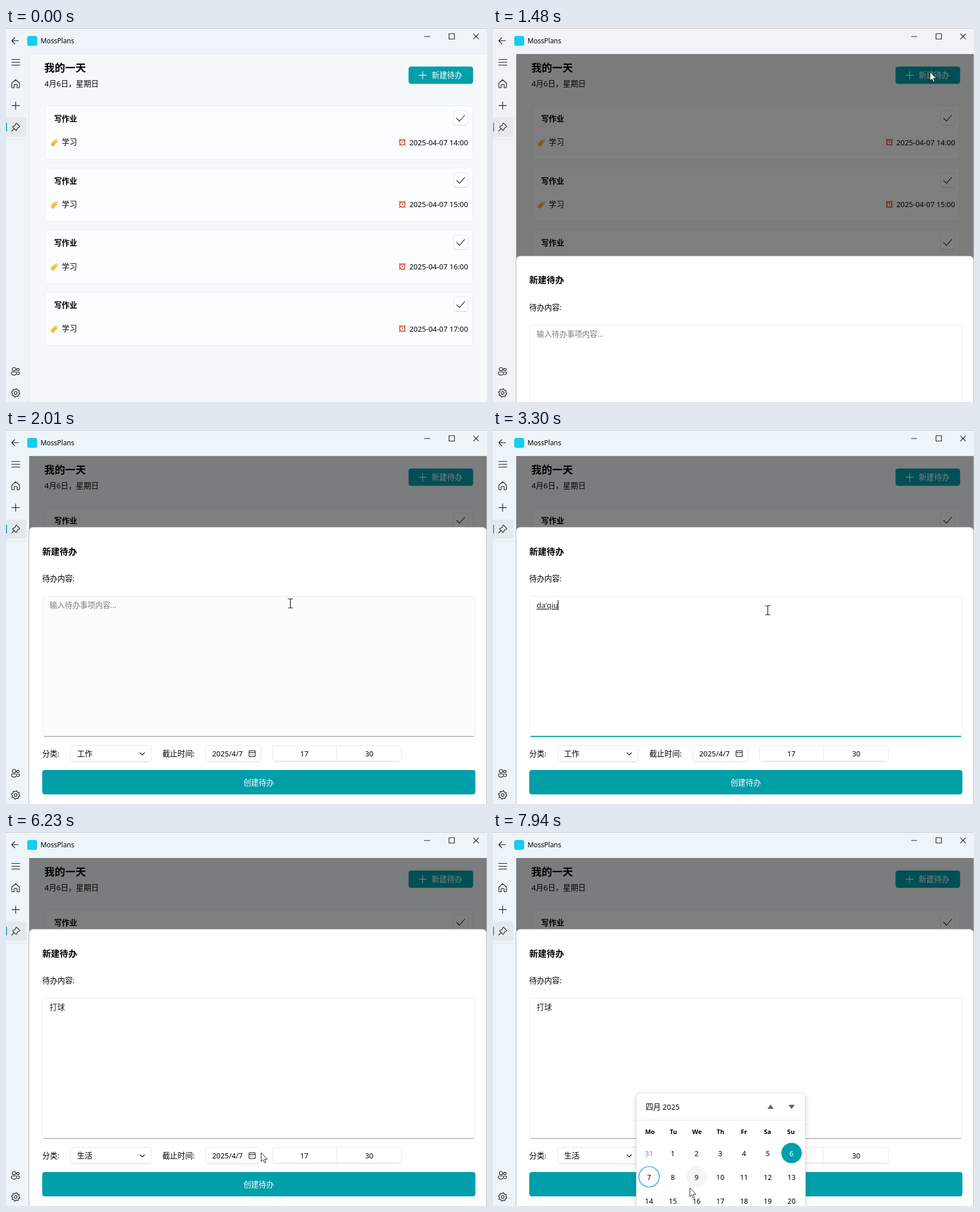
Animation of 849x660 px, one loop 8 s. Source, as an HTML page:

```html
<!DOCTYPE html>
<html lang="zh-CN">
<head>
<meta charset="utf-8">
<title>待办</title>
<style>
html, body { margin: 0; width: 100%; height: 100%; overflow: hidden; background: #f3f3f3; }
svg { display: block; width: 849px; height: 660px; }
text { font-family: "Noto Sans", "Open Sans", "Noto Sans CJK SC", "Noto Sans CJK JP", "Noto Sans CJK", sans-serif; white-space: pre; }
.line { fill: none; stroke: #1a1a1a; stroke-width: 1.15; stroke-linecap: round; stroke-linejoin: round; }
.pop { filter: drop-shadow(0 3px 5px rgba(0,0,0,.14)); }
</style>
</head>
<body>
<svg id="stage" viewBox="0 0 849 660" xmlns="http://www.w3.org/2000/svg"></svg>
<script>
const LOOP = 8000, TEAL = '#009faa', HOVER = '#00a7b3', PRESSED = '#3eabb3';
const svg = document.getElementById('stage');

// ---- markup helpers ----
const text = (x, mid, size, str, more = '') =>
  `<text x="${x}" y="${mid + size * .37}" font-size="${size}" ${more}>${str}</text>`;
const rect = (x, y, w, h, r, more) =>
  `<rect x="${x}" y="${y}" width="${w}" height="${h}" rx="${r}" ${more}/>`;
const line = (d, more = '') => `<path class="line" d="${d}" ${more}/>`;
const group = (id, body, more = '') => `<g id="${id}" ${more}>${body}</g>`;
const BOLD = 'font-weight="700"', MID = 'text-anchor="middle"', WHITE = 'fill="#fff"';

const field = (id, x, y, w, h) =>
  rect(x, y, w, h, 4.5, `id="${id}" fill="#fff" stroke="#e6e6e6"`) +
  `<path d="M${x + 4} ${y + h}h${w - 8}" stroke="#d2d2d2"/>`;

const tag = y => `<g transform="translate(85.5 ${y})">
  <path d="M-6.3 2 1 -5.2 5.4 -5.4 5.6 -1.2 -1.6 6.2Q-2.6 7 -3.6 6L-6.2 3.6Q-7 2.8 -6.3 2Z" fill="#f9bd35"/>
  <path d="M-6.4 3.2-3.2 6.3Q-2.4 6.8-1.6 6.2L0 4.5" fill="none" stroke="#e39a1f"/>
  <circle cx="3.2" cy="-3" r="1.3" fill="#fff"/><path d="M3.4-3.2 6-5.6" stroke="#b9b9b9"/></g>`;

const alarm = y => `<g transform="translate(699.5 ${y})">
  <path d="M-4 4-5.2 6M4 4 5.2 6" stroke="#8a4b2a" stroke-width="1.4"/>
  <circle cx="-4" cy="-4" r="2.3" fill="#f2a33a"/><circle cx="4" cy="-4" r="2.3" fill="#f2a33a"/>
  <circle r="4.7" cy=".4" fill="#fff" stroke="#e2452f" stroke-width="1.7"/>
  <path d="M0-2.4V.6L1.8 1.6" fill="none" stroke="#333" stroke-width=".9"/></g>`;

const card = i => {
  const y = 137.5 + 109.6 * i;
  return rect(69, y, 755, 94, 5, 'fill="#fff" fill-opacity=".72" stroke="#000" stroke-opacity=".055"') +
    text(85, y + 22.5, 13.5, '写作业', BOLD) +
    rect(790, y + 8.5, 25.5, 25.5, 4, 'fill="#fff" stroke="#e4e5e6"') +
    `<path d="M793 ${y + 34}h19.5" stroke="#cfcfcf"/>` +
    line(`M795.5 ${y + 22}l5 5 9-10.5`) +
    tag(y + 64.5) + text(98.5, y + 64, 13.4, '学习') +
    alarm(y + 64) + text(712, y + 64.5, 12.9, `2025-04-07 ${14 + i}:00`);
};

const gear = () => {
  let d = '';
  for (let i = 0; i < 32; i++) {
    const a = i * Math.PI / 16 + .1, r = i % 4 < 2 ? 7.4 : 5.8;
    d += `${i ? 'L' : 'M'}${(17 + r * Math.sin(a)).toFixed(2)} ${(644 - r * Math.cos(a)).toFixed(2)}`;
  }
  return line(d + 'Z') + '<circle class="line" cx="17" cy="644" r="2.5"/>';
};

const chrome = () =>
  '<path d="M0 .5H849" stroke="#c3c9ce"/>' +
  line('M10.5 22.5H22M15.5 17l-5.3 5.5 5.3 5.5') +
  rect(37.5, 14, 17.5, 17.5, 3.5, 'fill="#14cdf0"') +
  text(61, 22.8, 11.9, 'MossPlans') +
  line('M738.5 15h9.5M782 10h9.5v9.5h-9.5zM825.2 10.3l9 9M834.2 10.3l-9 9', 'stroke-width="1"') +
  line('M10 55.5H24.5M10 60.5H24.5M10 65.5H24.5') +
  line('M10.3 97.3 17 91.3l6.7 6v7.2q0 1-1 1h-3v-5q0-1-1-1h-3.4q-1 0-1 1v5h-3q-1 0-1-1z') +
  line('M10.3 136.8H23.7M17 130.2V143.5', 'stroke-width="1.3"') +
  rect(-4, 158, 40, 34, 4, 'fill-opacity=".045"') + rect(-2, 167, 3.6, 16, 1.6, `fill="${TEAL}"`) +
  line('M18.8 168.2 24.2 173.6Q24.4 174.6 23.4 175L20.2 176.6 18.6 180.2Q18 181 17.2 180.4L12 175.2Q11.4 174.4 12.2 173.8L15.8 172.2 17.4 168.8Q18 167.6 18.8 168.2M14.2 177.6 10 182') +
  '<path d="M0 196.5H39" stroke="#000" stroke-opacity=".055"/>' +
  '<circle class="line" cx="14.2" cy="602" r="3"/><circle class="line" cx="21" cy="602.8" r="2.2"/>' +
  line('M10.6 607h7.2q1 0 1 1 0 4.6-4.6 4.6t-4.6-4.6q0-1 1-1M20.6 607.2h2.4q1 0 1 1 0 3.4-4 3.4') +
  gear();

const form = () =>
  '<path d="M40.5 660V180Q40.5 171.5 49 171.5H840Q848.5 171.5 848.5 180V660V900H40.5Z" fill="#fff" stroke="#b5b5b5"/>' +
  text(64, 214, 15.3, '新建待办', BOLD) + text(64, 262.5, 13.4, '待办内容:') +
  rect(64.5, 293.5, 763.5, 247.5, 4.5, 'id="area" fill="#fff" stroke="#ededed"') +
  '<path id="under" d="M67 540.8H825.5" stroke-linecap="round"/>' +
  text(77, 309.5, 13.4, '', 'id="entry"') +
  '<path id="caret" stroke="#000" stroke-width="1.1"/>' +
  text(64, 571.5, 13.4, '分类:') + field('combo', 114, 556.5, 142.5, 29) +
  text(125.5, 571, 13.4, '', 'id="kind"') + line('M236.5 569.5l4 4 4-4', 'id="chev" stroke="#555"') +
  text(276, 571.5, 13.4, '截止时间:') + field('date', 352.5, 556.5, 97.5, 29) +
  group('day', text(364, 571.5, 12.9, '2025/4/7') +
    line('M431 565.5h7q2 0 2 2v7q0 2-2 2h-7q-2 0-2-2v-7q0-2 2-2M429 568.6h11') +
    line('M431.8 571.5h.1M434.5 571.5h.1M437.2 571.5h.1M431.8 574h.1M434.5 574h.1', 'stroke-width="1.5"')) +
  field('time', 470.5, 557, 227.5, 27.5) + '<path d="M583.5 557v27.5" stroke="#e6e6e6"/>' +
  text(526.5, 571.5, 12.9, '17', MID) + text(641, 571.5, 12.9, '30', MID) +
  rect(64, 600, 764.5, 43, 4.5, 'id="create"') + text(446, 622, 13.4, '创建待办', `${MID} ${WHITE}`);

const menu = () =>
  rect(113.5, 588.5, 143, 106, 7, 'class="pop" fill="#fafafa" stroke="#dcdcdc"') +
  rect(118, 593, 134, 31, 4, 'id="item0"') + rect(118, 625, 134, 31, 4, 'id="item1"') +
  rect(118, 601, 2.8, 15, 1.4, `fill="${TEAL}"`) +
  text(129, 608.5, 13.4, '工作') + text(129, 640.5, 13.4, '生活');

const cellX = c => 275.5 + 41.9 * c, cellY = r => 567 + 42 * r;
const calendar = () => {
  let s = rect(253, 460.5, 298.5, 320, 7, 'class="pop" fill="#fff" stroke="#dadada"') +
    text(269.5, 485.5, 13.2, '四月 2025', 'font-weight="500"') +
    '<path d="M485 488.2l5-6.6 5 6.6zM522 481.8h10l-5 6.6z" fill="#5e5e5e" stroke="#5e5e5e" stroke-width=".6" stroke-linejoin="round"/>' +
    '<path d="M253.5 508.5H551" stroke="#e6e6e6"/><circle id="spot" r="18" fill="#f5f5f5"/>' +
    `<circle cx="527" cy="566.5" r="18" fill="${TEAL}"/>` +
    `<circle cx="275.5" cy="608.5" r="18" fill="none" stroke="${TEAL}" stroke-width="1.2"/>`;
  ['Mo', 'Tu', 'We', 'Th', 'Fr', 'Sa', 'Su'].forEach((d, i) =>
    s += text(277 + 41.5 * i, 529, 11, d, `${MID} font-weight="600"`));
  for (let i = 0; i < 21; i++) {
    const fill = i === 0 ? '#8a8a8a' : i === 6 ? '#fff' : '#000';
    s += text(cellX(i % 7), cellY(i / 7 | 0) + .8, 12.5, i || 31, `${MID} fill="${fill}"`);
  }
  return s;
};

svg.innerHTML =
  '<clipPath id="drop"><rect id="dropBox" x="95" y="584" width="185" height="0"/></clipPath>' +
  rect(0, 0, 849, 660, 0, 'id="mica"') + chrome() +
  '<path d="M40.5 661V55Q40.5 45.5 50 45.5H850V661Z" fill="#fff" fill-opacity=".5" stroke="#000" stroke-opacity=".07"/>' +
  text(67.5, 70.5, 18.4, '我的一天', BOLD) + text(68, 98.5, 13.4, '4月6日，星期日') +
  rect(710.5, 68, 114, 30.5, 4.5, 'id="add"') +
  group('addLabel', line('M728.7 83.3h13.6M735.5 76.5v13.6', 'style="stroke:#fff"') + text(751.5, 83.5, 13.5, '新建待办', WHITE)) +
  [0, 1, 2, 3].map(card).join('') +
  rect(41, 46, 807.5, 614, 0, 'id="shade"') +
  group('form', form()) + group('menu', menu(), 'clip-path="url(#drop)"') + group('calendar', calendar()) +
  '<circle id="glow" r="11.7" fill="#fff428" fill-opacity=".7"/>' +
  '<path id="arrow" d="M.4 0V15.6L4 12.3 6.5 18 8.8 17 6.3 11.4H11.2Z" fill="#fff" stroke="#111" stroke-width=".9"/>' +
  '<path id="beam" d="M-4.5-8H-1.5Q0-8 0-7 0-8 1.5-8H4.5M0-7V7M-4.5 8H-1.5Q0 8 0 7 0 8 1.5 8H4.5" fill="none" stroke="#111" stroke-width="1.2"/>';

const el = {};
svg.querySelectorAll('[id]').forEach(n => el[n.id] = n);
const set = (id, attrs) => { for (const k in attrs) el[id].setAttribute(k, attrs[k]); };
const show = (id, on) => set(id, { visibility: on ? 'visible' : 'hidden' });

// ---- timing helpers ----
const ramp = (t, a, b) => Math.min(1, Math.max(0, (t - a) / (b - a)));
const out = p => 1 - (1 - p) ** 3;
const smooth = p => p * p * (3 - 2 * p);
const within = (t, a, b) => t >= a && t < b;
const mix = (a, b, p) => a + (b - a) * p;

// pointer stops: time, x, y
const stops = [
  [1050, 856, 190], [1270, 771, 77.5], [1590, 771, 77.5], [1800, 735, 163], [2010, 502, 306],
  [2140, 485, 318], [3950, 485, 318], [4640, 243, 566], [5260, 243, 566], [5410, 146, 626],
  [5860, 146, 626], [6230, 450, 566], [6640, 412, 570], [7570, 412, 570], [7930, 347, 628]
];
const pointer = t => {
  let i = 0;
  while (i < stops.length - 2 && t >= stops[i + 1][0]) i++;
  const [a, x, y] = stops[i], [b, u, v] = stops[i + 1], p = smooth(ramp(t, a, b));
  return [mix(x, u, p), mix(y, v, p)];
};

const presses = [[1320, 1400], [2200, 2290], [4670, 4800], [5600, 5670], [6690, 6770]];
const typed = [[2690, 'd'], [2760, 'da'], [3100, "da'q"], [3170, "da'qi"], [3240, "da'qiu"], [3370, '打球']];

function draw(t) {
  const [px, py] = pointer(t);
  const over = (x, y, w, h) => px >= x && px <= x + w && py >= y && py <= y + h;
  const formUp = t >= 1392, menuUp = within(t, 4780, 5680), calUp = t >= 7220;
  const live = formUp && !menuUp && !calUp;

  // window tint follows focus
  const tint = t < 1000 ? .8 * (1 - ramp(t, 60, 200)) : smooth(ramp(t, 1380, 1620));
  set('mica', { fill: `rgb(${mix(243, 237, tint)},${mix(243, 244, tint)},${mix(243, 250, tint)})` });

  const addDown = within(t, 1320, 1400);
  set('add', { fill: addDown ? PRESSED : !formUp && over(710, 68, 114, 30) ? HOVER : TEAL });
  set('addLabel', { opacity: addDown ? .63 : 1 });

  set('shade', { 'fill-opacity': .5 * ramp(t, 1390, 1470) });
  show('form', formUp);
  set('form', { transform: `translate(0 ${488 * (1 - out(ramp(t, 1392, 1795)))})` });

  const focus = within(t, 2200, 4660), inArea = live && t > 1870 && over(64, 293, 764, 248);
  set('area', { fill: inArea && !focus ? '#fcfcfc' : '#fff' });
  set('under', { stroke: focus ? TEAL : '#8c8c8c', 'stroke-width': focus ? 1.9 : 1 });

  let entry = '';
  for (const [at, s] of typed) if (t >= at) entry = s;
  const composing = entry && t < 3370;
  el.entry.textContent = entry || '输入待办事项内容...';
  set('entry', { fill: entry ? '#222' : '#7a7a7a', 'text-decoration': composing ? 'underline' : 'none' });
  const caretX = !entry ? 77 : composing ? 77 + el.entry.getComputedTextLength() : 103.5;
  set('caret', { d: `M${caretX} 300V318` });
  show('caret', focus && !within(t, 3770, 4300));

  const comboDown = within(t, 4670, 4800);
  el.kind.textContent = t < 5610 ? '工作' : '生活';
  set('combo', { fill: comboDown || live && over(114, 556, 143, 30) ? '#fafafa' : '#fff' });
  set('kind', { opacity: comboDown ? .63 : 1 });
  set('chev', { opacity: comboDown ? .4 : 1 });
  const dateDown = within(t, 6690, 6770);
  set('date', { fill: dateDown || live && t > 6300 && over(352, 556, 98, 30) ? '#fafafa' : '#fff' });
  set('day', { opacity: dateDown ? .63 : 1 });
  set('create', { fill: live && t > 5860 && over(64, 600, 764, 43) ? HOVER : TEAL });

  show('menu', menuUp);
  set('dropBox', { height: 80 * out(ramp(t, 4760, 5010)) });
  const item1 = over(118, 625, 134, 31);
  set('item0', { fill: item1 ? '#f5f5f5' : '#efefef' });
  set('item1', { fill: item1 ? '#efefef' : '#fafafa' });

  const rise = out(ramp(t, 7220, 7390));
  show('calendar', calUp);
  set('calendar', { opacity: rise, transform: `translate(0 ${8 * (1 - rise)})` });
  const c = Math.round((px - 275.5) / 41.9), r = Math.round((py - 567) / 42);
  set('spot', { cx: cellX(c), cy: cellY(r) - .5 });

  const shown = t >= 1050;
  show('arrow', shown && !inArea);
  show('beam', shown && inArea);
  show('glow', presses.some(([a, b]) => within(t, a, b)));
  for (const id of ['arrow', 'beam', 'glow']) set(id, { transform: `translate(${px} ${py})` });
}

const start = performance.now();
function tick() {
  draw((performance.now() - start) % LOOP);
  requestAnimationFrame(tick);
}
tick();
</script>
</body>
</html>
```
